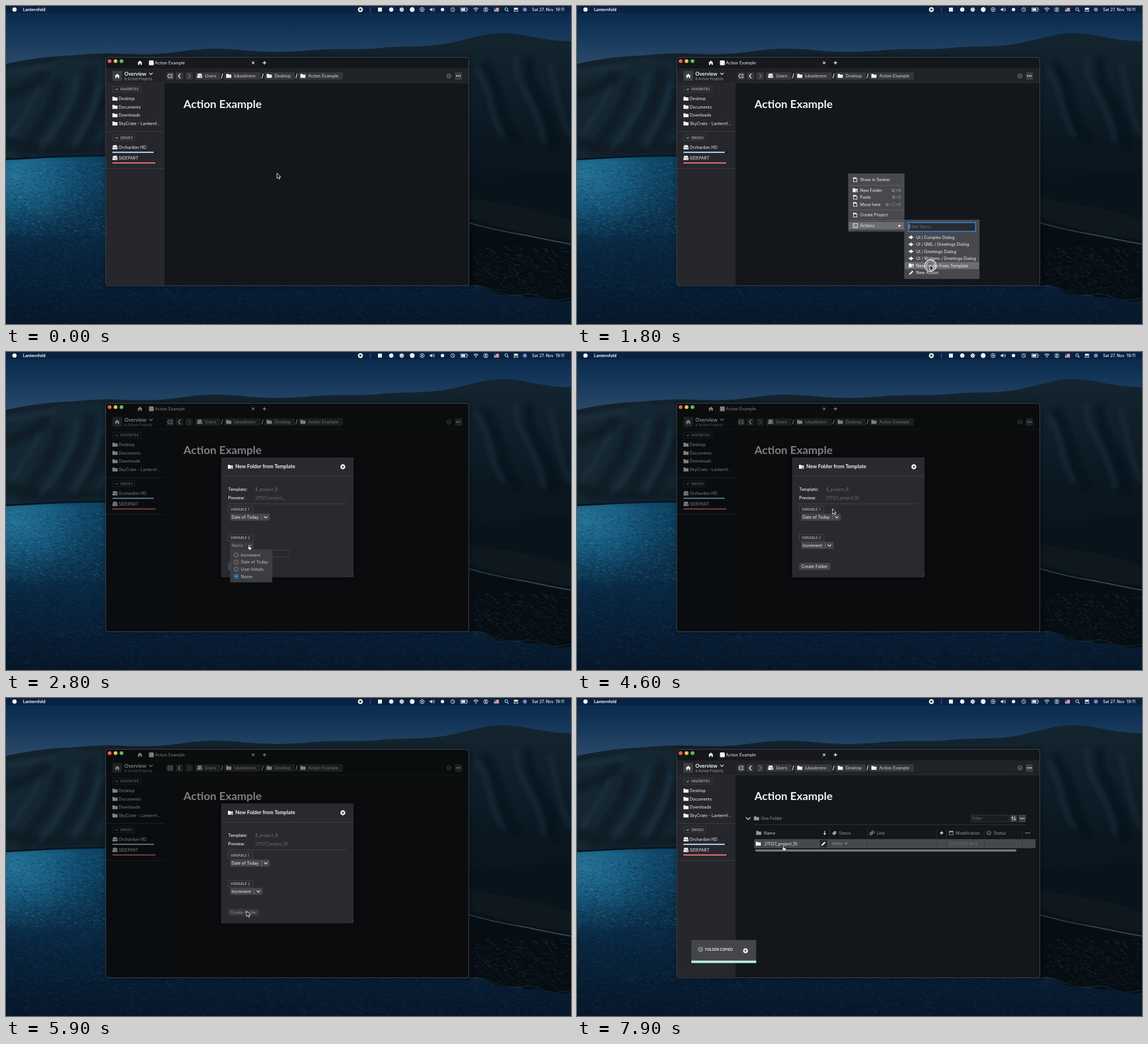
These frames come from a looping animation (998 by 561 pixels, 8000 ms). An HTML page:

```html
<!DOCTYPE html>
<html lang="en">
<head>
<meta charset="utf-8">
<title>Folder action demo</title>
<style>
html, body { margin: 0; width: 100%; height: 100%; overflow: hidden; background: #0a1c2c; }
svg { display: block; width: 100%; height: 100%; }
text { font-family: Inter, "Noto Sans", "DejaVu Sans", sans-serif; white-space: pre; }
text.head { font-family: Lato, "Open Sans", sans-serif; font-weight: 700; }
</style>
</head>
<body>
<svg id="stage" viewBox="0 0 998 561" preserveAspectRatio="none"></svg>
<script>
const WHITE = '#f2f2f3', GREY = '#97999e', FAINT = '#707277';

// ---- drawing helpers: each returns SVG markup ----
const rect = (x, y, w, h, fill, more = '') =>
  `<rect x="${x}" y="${y}" width="${w}" height="${h}" fill="${fill}" ${more}/>`;
const box = (x, y, w, h, stroke, fill = 'none', sw = .8) =>
  rect(x, y, w, h, fill, `stroke="${stroke}" stroke-width="${sw}"`);
const circle = (x, y, r, fill, more = '') => `<circle cx="${x}" cy="${y}" r="${r}" fill="${fill}" ${more}/>`;
const ring = (x, y, r, stroke, sw = 1) => circle(x, y, r, 'none', `stroke="${stroke}" stroke-width="${sw}"`);
const fill = (d, c, more = '') => `<path d="${d}" fill="${c}" ${more}/>`;
const line = (d, c, w = 1, more = '') =>
  `<path d="${d}" fill="none" stroke="${c}" stroke-width="${w}" ${more}/>`;
const text = (x, y, s, c = WHITE, size = 7.25, weight = 400, more = '') =>
  `<text x="${x}" y="${y}" fill="${c}" font-size="${size}" font-weight="${weight}" ${more}>${s}</text>`;
const head = (x, y, s, size) => `<text class="head" x="${x}" y="${y}" fill="${WHITE}" font-size="${size}">${s}</text>`;
const group = (id, ...parts) => `<g id="${id}">${parts.join('')}</g>`;

// ---- icons, placed by their centre ----
const folder = (x, y, c = WHITE) =>
  fill(`M${x - 4.5} ${y - 3.5}h3.4l1 1.2h4.6v5.8h-9z`, c);
const folderPlus = (x, y) => folder(x, y) + circle(x + 3, y + 2, 2.3, '#46474b') +
  line(`M${x + 1.2} ${y + 2}h3.6M${x + 3} ${y + .2}v3.6`, WHITE, .9);
const drive = (x, y) => fill(`M${x - 3} ${y - 4}h6l1.4 3.4h-8.8z`, WHITE) + rect(x - 4.5, y, 9, 3.5, WHITE, 'rx=".8"') +
  rect(x + 1, y + 1.2, 2, 1, '#55565a');
const chevron = (x, y, c = WHITE, r = 3) => line(`M${x - r} ${y - r / 2}l${r} ${r}l${r} ${-r}`, c, 1.2);
const home = (x, y) => fill(`M${x - 4.5} ${y + .2}L${x} ${y - 4}L${x + 4.5} ${y + .2}h-1.2v3.6h-2.1v-2.6h-2.4v2.6h-2.1v-3.6z`, WHITE);
const dots = (x, y, c = WHITE) => [-3, 0, 3].map(d => circle(x + d, y, 1.1, c)).join('');
const cross = (x, y, r, c, w = 1.2) => line(`M${x - r} ${y - r}l${2 * r} ${2 * r}m0 ${-2 * r}l${-2 * r} ${2 * r}`, c, w);
const plus = (x, y) => line(`M${x - 3} ${y}h6M${x} ${y - 3}v6`, WHITE, 1.4);
const check = (x, y, c = GREY) => ring(x, y, 3.6, c, .9) + line(`M${x - 1.7} ${y}l1.3 1.4l2.4 -2.8`, c, 1);
const closeDot = (x, y) => circle(x, y, 4.4, WHITE) + cross(x, y, 1.5, '#2c2d33', 1.1);
const pencil = (x, y) => fill(`M${x - 4} ${y + 4}l.8 -2.6l5 -5l1.8 1.8l-5 5z`, WHITE);
const actionIcon = (x, y) => fill(`M${x - 4.5} ${y - 1.2}h2l1.6 -2l1.4 0l.4 1.4l3.4 1.8l-3.4 1.8l-.4 1.4h-1.4l-1.6 -2h-2z`, WHITE);
const page = (x, y) => box(x - 3, y - 2, 6, 5.5, WHITE, 'none', 1) + rect(x - 4, y - 4, 6, 2.2, WHITE);
const calendar = (x, y) => box(x - 3.4, y - 3, 6.8, 6.4, GREY, 'none', 1) + rect(x - 3.4, y - 3, 6.8, 2, GREY);
const arrowDown = (x, y) => line(`M${x} ${y - 3.5}v6.5m-2.2 -2.4l2.2 2.4l2.2 -2.4`, WHITE, 1.1);
const tagBox = (x, y, w, s) => box(x, y, w, 11, '#4a4b50') + text(x + 4, y + 7.8, s, '#a7a8ac', 6, 600);

function seeded(n) {
  return () => (n = (n * 16807) % 2147483647) / 2147483647;
}

// Short random dashes inside a box, used for ripples and rock grain
function grain(seed, count, x, y, w, h, len, slope) {
  const rnd = seeded(seed);
  let d = '';
  for (let i = 0; i < count; i++) {
    const l = len * (.4 + rnd());
    d += `M${(x + w * rnd()).toFixed(1)} ${(y + h * rnd()).toFixed(1)}l${l.toFixed(1)} ${(l * slope * (rnd() - .3)).toFixed(1)}`;
  }
  return d;
}

const stops = list => list.map(([o, c]) => `<stop offset="${o}" stop-color="${c}"/>`).join('');
const gradient = (id, list) => `<linearGradient id="${id}" x1="0" y1="0" x2="0" y2="1">${stops(list)}</linearGradient>`;

function wallpaper() {
  const soft = 'filter="url(#soft)"';
  return '<defs>' +
    gradient('sky', [[0, '#0a2748'], [.35, '#113458'], [1, '#33506e']]) +
    gradient('hill', [[0, '#14242f'], [.5, '#101f2b'], [1, '#0a1822']]) +
    gradient('hillRight', [[0, '#13242f'], [.4, '#0a1721'], [1, '#060e15']]) +
    gradient('sea', [[0, '#0d4162'], [.3, '#0b3350'], [.65, '#08223a'], [1, '#07172a']]) +
    `<radialGradient id="glow">${stops([[0, '#2b83a8'], [.4, '#1a648a']])}<stop offset="1" stop-color="#0d4162" stop-opacity="0"/></radialGradient>` +
    '<filter id="soft"><feGaussianBlur stdDeviation="4"/></filter></defs>' +
    rect(0, 0, 998, 120, 'url(#sky)') +
    fill('M0 102C30 96 60 90 100 88S160 82 200 84S270 86 310 80S380 74 420 78S490 82 540 78S620 78 660 74S740 74 780 66S850 46 885 48S950 62 998 62V300H0Z', 'url(#hill)') +
    rect(0, 260, 998, 301, 'url(#sea)') +
    `<ellipse cx="15" cy="300" rx="190" ry="125" fill="url(#glow)" opacity=".75"/>` +
    fill('M0 112C30 100 55 108 90 96S150 100 190 90V264C120 263 70 269 0 271Z', '#142632') +
    line('M0 160C30 140 45 150 70 118M30 262C45 220 80 205 95 130M90 255C105 215 140 190 150 112M135 250C150 230 165 200 180 150M0 240Q70 262 178 250', '#07131d', 13, soft + ' opacity=".75"') +
    line('M8 230C30 190 45 180 60 140M60 255C75 225 115 200 125 120M120 250C130 220 158 200 165 135M0 120Q50 112 90 104', '#2a4150', 5, soft + ' opacity=".5"') +
    line('M0 270.5C50 269 80 264 178 264', '#08151e', 3) +
    line(grain(7, 900, 0, 274, 178, 130, 4, .5), '#5fa9c4', .7, 'opacity=".28"') +
    line(grain(11, 900, 0, 285, 178, 215, 4, .5), '#041525', .8, 'opacity=".4"') +
    line(grain(17, 700, 0, 390, 178, 110, 4, .5), '#2f6f92', .6, 'opacity=".28"') +
    line(grain(21, 1100, 0, 490, 998, 70, 5, .6), '#35608a', .7, 'opacity=".25"') +
    line(grain(23, 1100, 0, 490, 998, 70, 5, .6), '#030d18', .8, 'opacity=".35"') +
    fill('M780 88C830 70 860 60 900 62S960 76 998 74V520C960 528 930 505 890 510S850 480 817 492H780Z', 'url(#hillRight)') +
    line('M830 110C860 150 850 190 880 230M900 90C895 140 940 170 950 240M960 100C975 160 980 200 998 230', '#20353f', 8, soft + ' opacity=".5"') +
    line('M845 100C880 150 870 200 905 240M925 90C915 140 965 170 970 250', '#050d14', 11, soft + ' opacity=".6"') +
    fill('M817 300C870 310 930 285 998 292V420C930 415 870 405 817 380Z', '#08131b', 'opacity=".8"') +
    fill('M817 338C870 350 930 352 998 378V412C930 405 880 395 817 372Z', '#0f1a1f', 'opacity=".8"') +
    line('M817 382C850 392 880 398 910 403S960 414 998 420', '#49535a', 1.3) +
    fill('M817 386C870 400 930 408 998 426V515C975 520 965 505 940 512S915 505 890 510S850 488 817 494Z', '#060d13') +
    line(grain(33, 320, 825, 425, 165, 82, 6, 2), '#2f424b', .9, 'opacity=".45"') +
    line('M817 494C850 488 860 508 890 510S915 503 940 512S970 521 998 515', '#4f6a78', .8, 'opacity=".45"');
}

function menuBar() {
  const y = 6.3, w = WHITE;
  return rect(0, 0, 998, 12.5, '#0a2241', 'opacity=".88"') +
    circle(15, y, 3.8, w) + text(30, 8.9, 'Lanternfold', w, 7, 700) +
    circle(626, y, 4.4, w) + rect(624.4, 4.7, 3.2, 3.2, '#0a2241') +
    line('M643.5 2.5v8', '#7d8ba0', 1.2, 'stroke-dasharray="1.4 1"') +
    rect(657, 2.8, 7, 7, w) + circle(680.5, y, 3.8, w) +
    ring(699, y, 2.6, w, 1.5) + line('M699 1.8v9M694.5 6.3h9M695.8 3.1l6.4 6.4m0 -6.4l-6.4 6.4', w, .8) +
    circle(717.5, y, 4.2, w) + ring(735, y, 3.6, w) + fill('M734 4.3l3 2l-3 2z', w) +
    fill('M748.5 5h1.8l2.4 -2.2v7l-2.4 -2.2h-1.8z', w) + line('M754 4.3q1.6 2 0 4m1.6 -5.4q2.6 3.4 0 6.8', w, .8) +
    circle(771, y, 3, w) + ring(789, y, 3.4, w, .9) + line('M789 4.3v2.2l1.6 1', w, .9) +
    box(803.5, 3.3, 10.5, 6, w, 'none', .8) + rect(804.6, 4.4, 6.5, 3.8, w) + rect(814.8, 5.2, 1, 2.2, w) +
    line('M825.8 5q4.2 -3.6 8.4 0m-6.8 1.9q2.6 -2.2 5.2 0', w, 1.1) + circle(830, 8.7, 1, w) +
    ring(847.5, y, 3.7, w, .9) + circle(847.5, 5.2, 1.3, w) + fill('M845.2 8.6q2.3 -2.6 4.6 0z', w) +
    rect(862, 3, 8.5, 6.6, '#e8dfe2') + line('M862 4h8.5m-8.5 2.2h8.5m-8.5 2.2h8.5', '#c9505c', 1) + rect(862, 3, 3.8, 3.6, '#3b4f8c') +
    ring(883.5, 5.6, 2.5, w, 1) + line('M885.4 7.6l2.2 2.2', w, 1.1) +
    rect(897, 3, 7.5, 2.9, w, 'rx="1.4"') + box(897.4, 7, 6.8, 2.4, w) +
    circle(916.5, y, 3.5, '#7d83b8') +
    text(929, 8.8, 'Sat 27. Nov  19:11', w, 7.1, 500);
}

function sidebar() {
  const rows = ['Desktop', 'Documents', 'Downloads', 'SkyCrate - Lanternf...'];
  return box(188.5, 141.5, 50, 10.5, '#424348') + chevron(195.5, 147, GREY, 2.4) + text(202, 149.2, 'FAVORITES', '#a7a8ac', 6, 600) +
    rows.map((s, i) => folder(192.5, 163.5 + i * 14.6) + text(199, 166.2 + i * 14.6, s)).join('') +
    rect(176.5, 221, 103.5, .8, '#424348') +
    box(188.5, 227, 39, 10.5, '#424348') + chevron(195.5, 232.5, GREY, 2.4) + text(202, 234.7, 'DRIVES', '#a7a8ac', 6, 600) +
    drive(192.5, 249.5) + text(199, 252.3, 'Orchardon HD') + rect(188, 257, 78, 2.2, '#17181b') + rect(188, 257, 73, 2.2, '#b3d4f6') +
    drive(192.5, 268.3) + text(199, 271, 'SIDEPART') + rect(188, 275.8, 78, 2.2, '#17181b') + rect(188, 275.8, 76, 2.2, '#e27473') +
    rect(176.5, 286, 103.5, .8, '#424348');
}

function appWindow() {
  const crumb = (x, w, s, icon = folder) =>
    rect(x, 117, w, 13, '#36373c', 'rx="1"') + icon(x + 8, 123.3) + text(x + 17.5, 126, s, '#d9d9db');
  const slash = x => line(`M${x - 1} 127.5l2.4 -8.5`, WHITE, 1.1);
  const nav = x => rect(x, 117, 13, 13, '#36373c', 'rx="1"');
  return rect(175, 89, 643.5, 406, '#000', 'opacity=".35" filter="url(#soft)"') +
    rect(176, 90.5, 641.5, 403, '#13161a', 'rx="4"') +
    rect(176.5, 110, 640.5, 26, '#212226') + rect(176.5, 136, 103.5, 356.5, '#26272c') +
    group('panelShade', rect(176.5, 110, 640.5, 26, '#13181b'), rect(176.5, 136, 103.5, 356.5, '#13191d')) +
    rect(248, 92.5, 196.5, 17.5, '#17191d') +
    home(236.5, 100.3) + rect(252.5, 96, 8.5, 8.5, WHITE, 'rx="1.5"') + text(263, 102.8, 'Action Example') +
    cross(436.5, 100.3, 2.1, WHITE) + plus(456.5, 100.3) +
    rect(188, 114.5, 17, 17.5, '#3d3e43', 'rx="1"') + home(196.5, 123.5) +
    head(209, 122.8, 'Overview', 9) + chevron(256, 119.5) + text(209, 131, '8 Active Projects', '#a3a4a8', 6.2) +
    nav(283.5) + line('M288.5 119.5l-3 4l3 4m1 -7h5m-5 3h5m-5 3h5', WHITE, 1.1) +
    nav(300) + line('M308 119.5l-3.5 4l3.5 4', WHITE, 1.3) +
    nav(317) + line('M322 119.5l3.5 4l-3.5 4', '#77787c', 1.3) +
    crumb(334, 45, 'Users', drive) + slash(381.5) + crumb(385.5, 64.5, 'lukasbrenn') + slash(453) +
    crumb(457, 53, 'Desktop') + slash(513) + crumb(516.5, 78.5, 'Action Example') +
    check(782.3, 123.3) + rect(793, 117, 12.5, 13, '#3d3e43', 'rx="1"') + dots(799, 123.3) +
    rect(176.5, 135.5, 640.5, .7, '#303136') + sidebar() + head(313.5, 180, 'Action Example', 19.8);
}

// Window rim and lights stay bright above the dimming layer
function windowRim() {
  return rect(176, 90.5, 641.5, 403, 'none', 'rx="4" stroke="#50555b" stroke-width=".8"') +
    ['#f0605a', '#f3bd4e', '#57c353'].map((c, i) => circle(183 + i * 10.5, 97.3, 3.3, c)).join('');
}

function fileList() {
  const sep = x => rect(x, 231, .8, 34, '#303338');
  const date = x => text(x, 259.5, '27/11/2021 19:11', FAINT, 7);
  const title = (x, s) => text(x, 240.7, s, GREY);
  return group('list',
    chevron(302.5, 212.5, WHITE, 4), folder(317, 212.3, GREY), text(325, 215, 'One Folder', GREY),
    box(696, 206.5, 66.5, 12, '#3c3e43', '#1b1d21'), text(698.5, 215, 'Filter', FAINT),
    rect(765, 206, 12.5, 13, '#3d3e43'), line('M769.3 216v-6.5m-2 2l2 -2l2 2M773.3 209v6.5m-2 -2l2 2l2 -2', WHITE, .9),
    rect(780, 206, 13, 13, '#3d3e43'), dots(786.5, 212.5),
    rect(313, 222.8, 479, .8, '#3a3c41'), folder(321, 238, GREY), text(330, 240.7, 'Name', '#c9cacd'), arrowDown(437.5, 238),
    group('narrow', rect(313, 249, 479, 16, '#202327'), [446, 463, 529.5, 596].map(sep).join(''), plus(454.5, 238),
      calendar(471.5, 238), title(479.5, 'Modification...'), check(538, 238), title(546, 'Status'), dots(606.5, 238, GREY), date(467)),
    group('wide', rect(313, 249, 497, 16, '#202327'), group('rowHover', rect(313, 249, 497, 16, '#47484c')),
      [446, 512.5, 635.5, 652, 719, 786].map(sep).join(''),
      fill('M450.5 239l3.5 -4h4v4l-3.8 3.5z', GREY), title(462.5, 'Status'),
      ring(519.3, 239.3, 2, GREY, 1.2), ring(522.7, 236.5, 2, GREY, 1.2), title(529.5, 'Link'), plus(644, 238),
      calendar(661, 238), title(669, 'Modification...'), check(727.5, 238), title(736, 'Status'), dots(796, 238, GREY),
      date(656), text(450, 259, 'empty', GREY, 6.4), fill('M473 255.6h5l-2.5 3z', GREY),
      rect(315, 267, 461, 4, '#737477', 'rx="1"')),
    group('edit', rect(429, 250.5, 13, 13, '#26272b', 'rx="1"'), pencil(435.3, 257)),
    folder(320.3, 257), text(331, 259.5, '211127_project_10'));
}

function contextMenu() {
  const sep = y => rect(480, y, 98, .8, '#66676b');
  const key = (y, s) => text(572.5, y, s, '#a0a1a4', 7.25, 400, 'text-anchor="end"');
  const row = (y, s, icon) => icon(491.5, y - 2.6) + text(500, y, s);
  return group('menu', rect(479.5, 296, 98.5, 101.5, '#48494d', 'stroke="#5a5b5f" stroke-width=".6"'),
    group('actionsHover', rect(480, 381, 97.5, 13, '#6c6d70')),
    row(309, 'Show in Seeker', page), sep(316), row(327.6, 'New Folder', folderPlus), key(327.6, '⌘+N'),
    row(340.1, 'Paste', page), key(340.1, '⌘+V'), row(352.6, 'Move here', page), key(352.6, '⌘+⌥+V'),
    sep(359.5), row(371.4, 'Create Project', page), sep(378),
    box(488, 383.8, 7.5, 7.2, WHITE, 'none', 1), line('M489.5 386l1.6 1.4l-1.6 1.4m2.4 .4h2', WHITE, .8),
    text(500, 390, 'Actions'), fill('M568 385.5l4.5 2.2l-4.5 2.2z', WHITE));
}

function subMenu() {
  const rows = ['UI / Complex Dialog', 'UI / QML / Greetings Dialog', 'UI / Greetings Dialog',
    'UI / Widgets / Greetings Dialog', 'New Folder From Template', 'New Action'];
  const icons = [actionIcon, actionIcon, actionIcon, actionIcon, folderPlus, pencil];
  return group('sub', rect(578.5, 377.5, 132, 103.5, '#48494d', 'stroke="#5a5b5f" stroke-width=".6"'),
    box(585, 382, 119, 15.5, '#2f87e0', '#2a2b30', 1.6), text(587, 392.4, 'Filter Items', FAINT), rect(586.7, 385, .7, 9, WHITE),
    `<rect id="subHover" x="579" width="131" height="12.5" fill="#6c6d70"/>`,
    rows.map((s, i) => icons[i](590.5, 408 + i * 12.45) + text(599, 410.7 + i * 12.45, s)).join(''));
}

function dropdown(x, y, w, s) {
  return rect(x, y, w, 12.5, '#45464b', 'rx="1"') + text(x + 2.5, y + 8.7, s) +
    rect(x + w - 15, y + 2, .8, 8.5, '#77787c') + chevron(x + w - 7.2, y + 6.4);
}

function dialog() {
  const choices = ['Increment', 'Date of Today', 'User Initials', 'Name'];
  return group('dialog', rect(378, 186, 238, 214, '#000', 'opacity=".4" filter="url(#soft)"'),
    rect(380, 186, 234, 211.5, '#292a2f'), folderPlus(396.5, 202.5), head(405, 205.3, 'New Folder from Template', 9),
    closeDot(595, 202.5), rect(380, 219, 234, .8, '#414247'), line('M609.5 396.5l3.5 -3.5', FAINT, .7),
    text(392.5, 245.4, 'Template:', WHITE, 7.2, 500), text(440, 245.4, '$_project_$', FAINT),
    text(392.5, 260, 'Preview:', WHITE, 7.2, 500), `<text id="preview" x="440" y="260" fill="${FAINT}" font-size="7.25"></text>`,
    rect(392.5, 267.5, 209.5, .8, '#4c4d52'), tagBox(392.5, 272, 43.5, 'VARIABLE 1'), dropdown(396, 285, 70, 'Date of Today'),
    tagBox(392.5, 322, 44, 'VARIABLE 2'),
    group('nameInput', box(396.5, 349.5, 104, 11.5, '#44454b', '#27282c')),
    group('nameButton', dropdown(396, 334.8, 42, 'Name')),
    group('incButton', dropdown(396, 334.8, 57, 'Increment')),
    group('create', rect(392.5, 372, 55, 12.5, '#45464b', 'rx="1"'), text(396.3, 380.8, 'Create Folder')),
    group('popup', rect(396.5, 348.5, 73.5, 57.5, '#3c3d41', 'stroke="#4d4e53" stroke-width=".5"'),
      group('choiceHover', rect(397, 351.5, 72.5, 12.8, '#606165')),
      choices.map((s, i) => {
        const y = 358 + i * 12.6, on = i === 3;
        return circle(406.8, y, 3.8, on ? '#1c3d58' : '#45464b', `stroke="${on ? '#3b93d8' : '#85868a'}" stroke-width=".9"`) +
          (on ? circle(406.8, y, 2.2, '#3b93d8') : '') + text(415, y + 2.7, s, '#c4c5c8');
      }).join('')));
}

const toast = () => group('toast', rect(202, 427, 114.5, 40.5, '#45464b', 'rx="1"'), check(218.2, 443.5, '#b7efe4'),
  text(226.3, 445.7, 'FOLDER COPIED', WHITE, 6.2, 600), closeDot(297.7, 446), rect(202, 463.3, 114.5, 4.2, '#b5efe4'));

const pointer = () => group('cursor',
  group('clickRing', ring(.8, 1, 10, '#f4f4f4', 1.4), ring(.8, 1, 7.2, '#d8d8d8', .9)),
  group('arrow', fill('M0 0v9.4l2.1 -2l1.5 3.4l1.6 -.7l-1.5 -3.3h2.9z', '#0b0b0c', 'stroke="#fff" stroke-width=".9"')),
  group('hand', fill('M0 .8q1 -1 1.8 0v3.4l3.2 .8q1 .4 .8 1.6l-.6 2.8h-4l-2.6 -3.2q.2 -1 1.4 -.4z', '#f4f4f4', 'stroke="#111" stroke-width=".7"')));

document.getElementById('stage').innerHTML = wallpaper() + menuBar() + appWindow() + fileList() +
  group('dim', rect(176.5, 91, 640.5, 402, '#000', 'rx="4"')) + windowRim() + dialog() +
  contextMenu() + subMenu() + toast() + pointer();

// ---- motion ----
const LOOP = 8000, STEP = 100;
const path = [ // time, x, y of the pointer tip
  [0, 478.7, 294.8], [500, 478.7, 294.8], [900, 512, 386], [1300, 512, 386], [1450, 592, 389], [1700, 623.5, 457],
  [2200, 623.5, 457], [2700, 428, 339.5], [3000, 428, 339.5], [3300, 428, 348], [4500, 428, 348], [4600, 451.3, 276.5],
  [5100, 446, 298], [5300, 446, 298], [5700, 425, 376], [7000, 425, 376], [7600, 363.5, 260], [8000, 363.5, 260]];

const $ = id => document.getElementById(id);
const alpha = (id, v) => $(id).setAttribute('opacity', +v);
const within = (t, a, b) => t >= a && t < b;
const ramp = (t, a, d) => Math.min(1, Math.max(0, (t - a) / d));

function pointerAt(t) {
  const i = path.findIndex(p => p[0] > t);
  const [t0, x0, y0] = path[i - 1], [t1, x1, y1] = path[i];
  const k = (t - t0) / (t1 - t0), e = k * k * (3 - 2 * k);
  return [x0 + (x1 - x0) * e, y0 + (y1 - y0) * e];
}

function render(t) {
  const [x, y] = pointerAt(t);
  $('cursor').setAttribute('transform', `translate(${x} ${y})`);
  const hand = within(t, 2700, 3700) || t >= 7500;
  alpha('hand', hand);
  alpha('arrow', !hand);
  alpha('clickRing', within(t, 400, 600) || within(t, 1800, 2000));

  alpha('menu', within(t, 500, 1900));
  alpha('actionsHover', t >= 800);
  alpha('sub', within(t, 900, 1900));
  const row = Math.floor((y - 401.8) / 12.45);
  alpha('subHover', row >= 0 && row < 6);
  $('subHover').setAttribute('y', 401.8 + 12.45 * row);

  const open = ramp(t, 1900, 200) * (1 - ramp(t, 5900, 200));
  alpha('dim', .48 * open);
  alpha('panelShade', open);
  alpha('dialog', open);
  const increment = t >= 3700;
  $('preview').textContent = '211127_project_' + (increment ? '10' : '');
  alpha('nameButton', increment ? 0 : within(t, 2700, 3700) ? .55 : 1);
  alpha('nameInput', !increment);
  alpha('incButton', increment);
  alpha('popup', within(t, 2800, 3700));
  alpha('choiceHover', t >= 3300);
  alpha('create', t >= 5800 ? .5 : 1);

  alpha('list', t >= 6900);
  alpha('narrow', t < 7200);
  alpha('wide', t >= 7200);
  alpha('rowHover', t >= 7500);
  alpha('edit', t >= 7500);
  alpha('toast', ramp(t, 7500, 300));
}

const start = performance.now();
function tick() {
  const t = (performance.now() - start) % LOOP;
  render(Math.floor(t / STEP) * STEP);
  requestAnimationFrame(tick);
}
tick();
</script>
</body>
</html>
```
